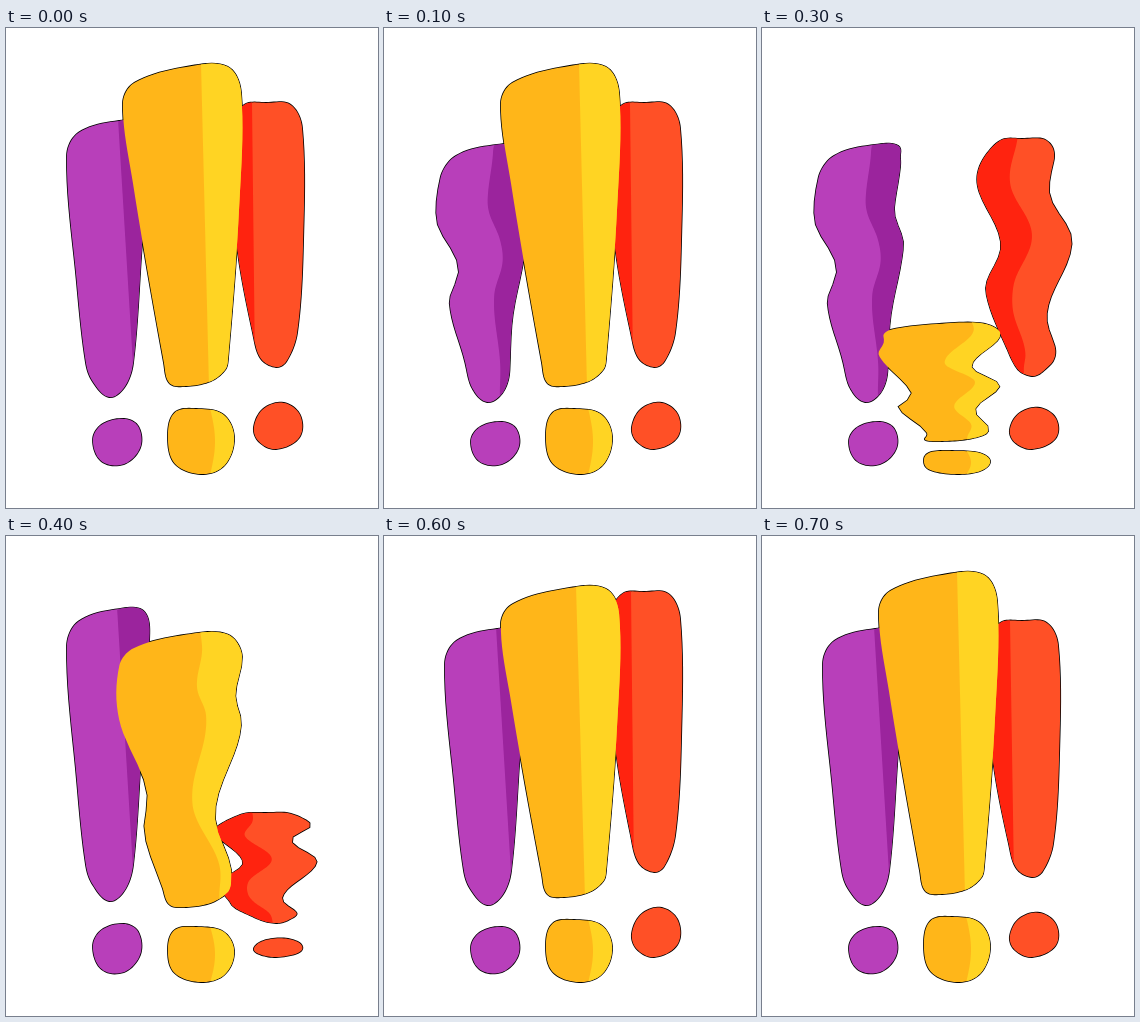
Write an HTML page with a canvas that moves like this. It is 372 px wide and 480 px high and loops after 0.8 s.

```html
<!DOCTYPE html>
<html lang="en">
<head>
<meta charset="utf-8">
<title>Bouncing exclamation marks</title>
<style>
  html, body { margin: 0; width: 100%; height: 100%; overflow: hidden; background: #fff; }
  canvas { display: block; }
</style>
</head>
<body>
<canvas id="stage" width="372" height="480"></canvas>
<script>
const ctx = document.getElementById('stage').getContext('2d');
const STEP = 100, STEPS = 8;
const BOUNCE = ['wavy', 'squash', 'wavy', 'tall', 'low'];

// pose: [body top, body bottom, dot top, shade edge x at top, and at bottom]
// sway: sideways bends of the left and right edge as [height fraction, offset]
const marks = [
  {
    main: '#b83fba', shade: '#9b249d', side: 400, mid: 103, follow: 0.5, delay: 1,
    body: '60,128 72,104 113,92 139,95 144,125 137,215 128,335 119,360 103,370 86,354 79,335 70,255',
    dot: '86,412 95,396 118,390 133,398 135,420 118,437 95,434',
    pose: {
      rest: [91, 370, 390, 112, 129],
      wavy: [115, 375, 393, 112, 116],
      squash: [277, 407, 416, 119, 123],
      tall: [71, 366, 387, 111, 129],
      low: [110, 374, 393, 116, 121]
    },
    sway: {
      wavy: [[[.29, -10], [.48, 7], [.62, -6], [.88, 3]], [[.06, -5], [.25, -9], [.4, 4], [.71, -4]]],
      squash: [[[.29, -19], [.46, 10], [.72, -17]], [[.33, -12], [.485, 4], [.75, -5]]]
    }
  },
  {
    main: '#ff5026', shade: '#ff230f', side: -40, mid: 265, follow: 0.5, delay: 3,
    body: '224,98 238,76 260,74 285,76 297,100 298,215 292,305 281,334 270,340 254,331 246,305 231,225 223,135',
    dot: '247,399 257,380 278,374 295,387 294,410 270,422 252,414',
    pose: {
      rest: [74, 340, 374, 246, 249],
      wavy: [110, 349, 379, 256, 262],
      squash: [276, 388, 401.5, 246, 267],
      tall: [55, 337, 371, 247, 250],
      low: [84, 342, 376, 248, 252]
    },
    sway: {
      wavy: [[[.18, -8], [.44, 11], [.65, -11]], [[.22, -11], [.435, 12], [.74, -10], [.93, 5]]],
      squash: [[[.17, -14], [.446, 9], [.66, -24], [.83, -19]], [[.116, 8], [.25, -13], [.44, 13], [.77, -18], [.93, 3]]]
    }
  },
  {
    main: '#ffb619', shade: '#ffd423', side: 400, mid: 180, follow: 1, delay: 2,
    body: '116,75 128,54 180,38 222,38 236,65 234,180 223,330 220,342 205,354 180,359 163,356 157,335 126,155',
    dot: '161,408 168,384 190,380 218,386 229,410 219,438 195,447 168,436',
    dotEdge: 204,
    pose: {
      rest: [36, 359, 380, 195, 203],
      wavy: [96, 372, 390, 194, 214],
      squash: [294, 414, 422, 209, 205],
      tall: [23, 357, 378, 186, 200],
      low: [50, 362, 383, 192, 201]
    },
    sway: {
      wavy: [[[.315, -11], [.576, 3], [.74, -8]], [[.08, 1], [.23, -7], [.333, 0], [.648, -20], [.9, 3]]],
      squash: [[[.15, 5], [.28, -5], [.6, 11], [.717, -9], [.93, 7]], [[.09, 3], [.367, -25], [.533, 6], [.733, -14], [.9, 4]]]
    }
  }
];

const parse = s => s.split(' ').map(p => p.split(',').map(Number));
const mix = (a, b, t) => a + (b - a) * t;
const clamp = t => Math.max(0, Math.min(1, t));

// Sample a smooth closed curve through a few points.
function smooth(pts, n = 10) {
  const at = i => pts[(i + pts.length) % pts.length];
  const out = [];
  pts.forEach((b, i) => {
    const a = at(i - 1), c = at(i + 1), d = at(i + 2);
    const len = Math.hypot(c[0] - b[0], c[1] - b[1]);
    const k1 = len / Math.hypot(c[0] - a[0], c[1] - a[1]);
    const k2 = len / Math.hypot(d[0] - b[0], d[1] - b[1]);
    for (let j = 0; j < n; j++) {
      const t = j / n, u = 1 - t;
      out.push([0, 1].map(e => {
        const p = b[e] + (c[e] - a[e]) * k1 / 3;
        const q = c[e] - (d[e] - b[e]) * k2 / 3;
        return u * u * u * b[e] + 3 * u * u * t * p + 3 * u * t * t * q + t * t * t * c[e];
      }));
    }
  });
  return out;
}

// Eased value between bends, zero at both ends.
function bend(knots, t) {
  if (t <= 0 || t >= 1) return 0;
  const all = [[0, 0], ...knots, [1, 0]];
  const i = all.findIndex(k => k[0] > t);
  const [a, b] = [all[i - 1], all[i]];
  return mix(a[1], b[1], (1 - Math.cos(Math.PI * (t - a[0]) / (b[0] - a[0]))) / 2);
}

// Move a clockwise outline inwards so that its stroke stays inside the shape.
function inset(pts, d) {
  const n = pts.length;
  return pts.map(([x, y], i) => {
    const [ax, ay] = pts[(i + n - 1) % n], [bx, by] = pts[(i + 1) % n];
    const len = Math.hypot(bx - ax, by - ay) || 1;
    return [x - (by - ay) / len * d, y + (bx - ax) / len * d];
  });
}

function polygon(pts) {
  const path = new Path2D();
  pts.forEach(p => path.lineTo(...p));
  path.closePath();
  return path;
}

// Area between the curve x(t) and one side of the stage.
function shadeArea(xAt, top, bottom, side) {
  const pts = [];
  for (let t = -0.1; t <= 1.1; t += 0.01) pts.push([xAt(t), mix(top, bottom, t)]);
  return polygon([...pts, [side, bottom + 60], [side, top - 60]]);
}

function build(m, step) {
  const name = BOUNCE[(step - m.delay + STEPS) % STEPS] || 'rest';
  const [top, bottom, dotTop, x0, x1] = m.pose[name];
  const [restTop, restBottom, restDot] = m.pose.rest;
  const [left, right] = m.sway[name] || [[], []];
  const shift = (t, s) => mix(bend(left, t), bend(right, t), s);

  const body = smooth(parse(m.body)).map(([x, y]) => {
    const t = (y - restTop) / (restBottom - restTop);
    return [x + shift(t, clamp(0.5 + (x - m.mid) / 40)), mix(top, bottom, t)];
  });
  const dotPts = parse(m.dot);
  const base = Math.max(...dotPts.map(p => p[1]));
  const dot = smooth(dotPts).map(([x, y]) => [x, mix(dotTop, base, (y - restDot) / (base - restDot))]);

  const edge = t => mix(x0, x1, t) + shift(t + 0.03, m.follow);
  const dotEdge = t => m.dotEdge + 5 * Math.sin(Math.PI * clamp(t));
  const part = (pts, area) => ({ main: m.main, shade: m.shade, outline: polygon(inset(pts, 0.9)), area });
  return [
    part(body, shadeArea(edge, top, bottom, m.side)),
    part(dot, m.dotEdge && shadeArea(dotEdge, dotTop, base, m.side))
  ];
}

const scenes = Array.from({ length: STEPS }, (_, i) => marks.flatMap(m => build(m, i)));

function draw(parts) {
  ctx.fillStyle = '#fff';
  ctx.fillRect(0, 0, 372, 480);
  ctx.strokeStyle = '#000';
  ctx.lineWidth = 1.6;
  parts.forEach(p => ctx.stroke(p.outline));
  for (const p of parts) {
    ctx.fillStyle = p.main;
    ctx.fill(p.outline);
    if (!p.area) continue;
    ctx.save();
    ctx.clip(p.outline);
    ctx.fillStyle = p.shade;
    ctx.fill(p.area);
    ctx.restore();
  }
}

const start = performance.now();
function tick() {
  const t = Math.max(0, performance.now() - start);
  draw(scenes[Math.floor(t / STEP) % STEPS]);
  requestAnimationFrame(tick);
}
tick();
</script>
</body>
</html>
```
